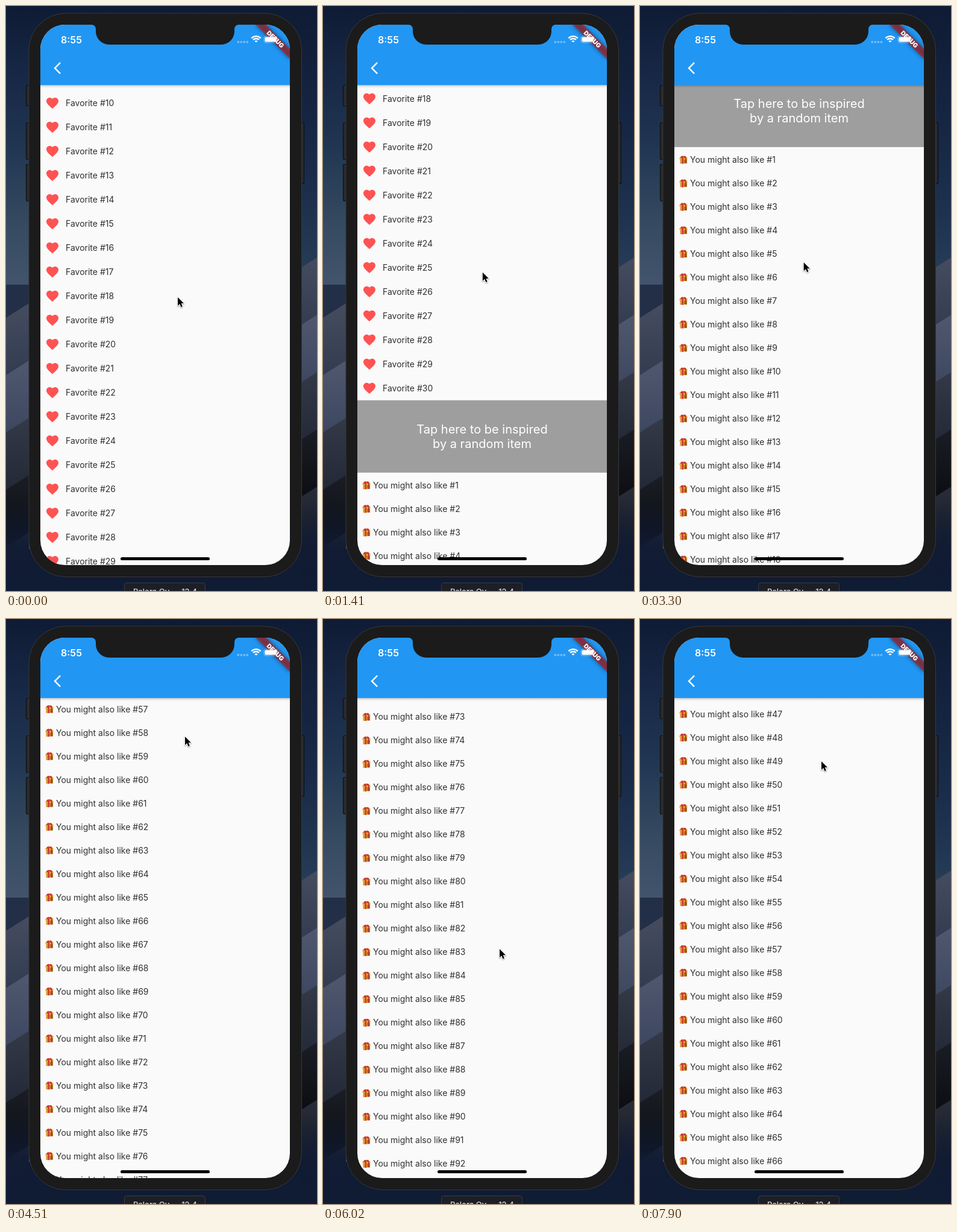
An HTML page with a canvas for the animation above (7.99 s loop, 516 by 970 pixels).

```html
<!DOCTYPE html>
<html lang="en">
<head>
<meta charset="utf-8">
<title>Favorites list</title>
<style>
  html, body { margin: 0; width: 100%; height: 100%; overflow: hidden; background: #101c36; }
  canvas { display: block; }
</style>
</head>
<body>
<canvas id="stage" width="516" height="970"></canvas>
<script>
const ctx = document.getElementById('stage').getContext('2d');
const LOOP = 7990;
const FONT = 'Inter, Roboto, sans-serif';
const SCREEN = { x: 57, y: 31, w: 414, h: 896 };
const BAR_BOTTOM = 131;
const INK = '#303030';

const mix = (a, b, u) => a + (b - a) * u;
const clamp = u => Math.min(1, Math.max(0, u));
const smooth = u => u * u * (3 - 2 * u);
const square = u => u * u;
const part = (t, [t0, t1]) => clamp((t - t0) / (t1 - t0));

// ---- motion ----
// Each gesture drags the list by `travel`, then lets it coast; the pointer glides on to the next start.
const GESTURES = [
  { time: [0, 790], from: [285, 483], to: [269, 110], travel: 320, coast: 10.2, glide: [880, 2050] },
  { time: [2490, 2850], from: [217, 880], to: [263, 308], travel: 537.2, coast: 0, glide: [3180, 3375] },
  { time: [3560, 3800], from: [291, 481], to: [297, 195], travel: 268, coast: 2664, glide: [5350, 6050] },
  { time: [6560, 6860], from: [293, 549], to: [297, 840], travel: -266, coast: -864, glide: [7380, 7900] }
];
const FIRST_SCROLL = 240, LAST_POINT = [301, 236];
const COAST_LIMIT = 2490, COAST_DECAY = 500;

const dragPart = (g, t) => (Math.abs(g.coast) > 50 ? square : smooth)(part(t, g.time));

function scrollAt(t) {
  return GESTURES.reduce((s, g, i) => {
    const next = GESTURES[i + 1];
    const until = Math.min(t, next ? next.time[0] : LOOP);
    const age = Math.min(COAST_LIMIT, Math.max(0, until - g.time[1]));
    return s + g.travel * dragPart(g, t) + g.coast * (1 - Math.exp(-age / COAST_DECAY));
  }, FIRST_SCROLL);
}

function pointerAt(t) {
  const i = GESTURES.findLastIndex(g => g.time[0] <= t);
  const g = GESTURES[i];
  const next = GESTURES[i + 1] ? GESTURES[i + 1].from : LAST_POINT;
  if (t < g.time[1]) return g.from.map((v, k) => mix(v, g.to[k], dragPart(g, t)));
  const u = smooth(part(t, g.glide));
  return [mix(g.to[0], next[0], u ** 3), mix(g.to[1], next[1], u)];
}

// ---- drawing helpers ----
function box(x, y, w, h, color) {
  ctx.fillStyle = color;
  ctx.fillRect(x, y, w, h);
}
function roundBox(x, y, w, h, r, fill, line) {
  ctx.beginPath();
  ctx.roundRect(x, y, w, h, r);
  if (fill) { ctx.fillStyle = fill; ctx.fill(); }
  if (line) { ctx.strokeStyle = line; ctx.lineWidth = 1; ctx.stroke(); }
}
function fade(y0, y1, ...colors) {
  const g = ctx.createLinearGradient(0, y0, 0, y1);
  colors.forEach((c, i) => g.addColorStop(i / (colors.length - 1), c));
  return g;
}
function text(str, x, y, font, color, align = 'left') {
  ctx.font = font + ' ' + FONT;
  ctx.fillStyle = color;
  ctx.textAlign = align;
  ctx.fillText(str, x, y);
}
function icon(path, x, y, color) {
  ctx.save();
  ctx.translate(x, y);
  ctx.fillStyle = color;
  ctx.fill(path);
  ctx.restore();
}

// ---- desktop and device ----
function drawDunes(x, top) {
  for (let i = 0; i < 5; i++) {
    const y = top + i * 95;
    const light = 17 + 13 * Math.sin(i * 1.3 + .6);
    ctx.beginPath();
    ctx.moveTo(x, y + 12);
    ctx.lineTo(x + 38, y - 12);
    ctx.lineTo(x + 38, 970);
    ctx.lineTo(x, 970);
    ctx.fillStyle = fade(y - 12, y + 130, `hsl(224 16% ${light + 8}%)`, `hsl(222 24% ${light}%)`);
    ctx.fill();
  }
  box(x, 820, 38, 150, fade(820, 970, 'rgba(16,27,52,0)', 'rgba(16,27,52,.9)', '#101b34'));
}

function drawDesktop() {
  box(0, 0, 258, 970, fade(0, 470, '#0f1b34', '#172846', '#213652', '#34495f', '#43556d'));
  box(258, 0, 258, 970, fade(0, 440, '#0f1b34', '#14233f', '#1a2d4a', '#263c57'));
  box(0, 462, 38, 60, '#232f47');
  drawDunes(0, 505);
  drawDunes(480, 428);
  box(38, 900, 452, 70, '#101b34');
}

function drawDevice() {
  [[33, 131, 34], [33, 193, 61], [33, 262, 61], [488, 193, 101]].forEach(([x, y, h]) =>
    roundBox(x + .5, y + .5, 6, h, 1.5, '#28292b', '#0b0c0f'));
  roundBox(38, 12, 452.5, 934.5, 61, '#1b1b1b', '#36383d');
  roundBox(196.5, 956.5, 134, 30, 4, '#1c1f25', '#393c44');
  text('Pelora Qv — 12.4', 264, 976, '500 13px', '#d5d7dc', 'center');
}

// ---- list ----
const heart = new Path2D('M12 21.35l-1.45-1.32C5.4 15.36 2 12.28 2 8.5 2 5.42 4.42 3 7.5 3' +
  'c1.74 0 3.41.81 4.5 2.09C13.09 3.81 14.76 3 16.5 3 19.58 3 22 5.42 22 8.5' +
  'c0 3.78-3.4 6.86-8.55 11.54L12 21.35z');
const chevron = new Path2D('M11.67 3.87L9.9 2.1 0 12l9.9 9.9 1.77-1.77L3.54 12z');
const arrow = new Path2D('M0 0V14L3.2 11 5.5 16.2 7.8 15.2 5.7 10.1 10 10z');

function drawFavorite(n, y) {
  icon(heart, 65, y - 12, '#ff5252');
  text('Favorite #' + n, 99, y + 5, '14px', INK);
}

function drawGift(x, y) {
  box(x - 5.5, y - 2, 6.5, 8.5, '#e2982f');
  box(x + 1, y - 2, 5, 8, '#b36f28');
  box(x - 6.5, y - 4, 13, 3.5, '#e8a840');
  box(x - 2.5, y - 4, 2.5, 10.5, '#cf3a2c');
  box(x + 3, y - 3, 1.5, 9, '#a3301f');
  ctx.fillStyle = '#c8382b';
  [-1, 1].forEach(side => {
    ctx.beginPath();
    ctx.ellipse(x + 2.4 * side, y - 4.6, 2.6, 1.7, .4 * side, 0, 7);
    ctx.fill();
  });
}

function drawList(s) {
  const { x, y, w, h } = SCREEN, end = y + h + 20;
  box(x, y, w, h, '#fafafa');
  for (let n = 1; n <= 30; n++) {
    const c = 40 * n + 1 - s;
    if (c > 100 && c < end) drawFavorite(n, c);
  }
  const top = 1221 - s;
  if (top > 0 && top < end) {
    box(x, top, w, 120, '#9e9e9e');
    text('Tap here to be inspired', 264, top + 55, '20px', '#fff', 'center');
    text('by a random item', 264, top + 79, '20px', '#fff', 'center');
  }
  for (let m = Math.max(1, Math.floor((s - 1223) / 39)); ; m++) {
    const c = 1323 + 39 * m - s;
    if (c > end) break;
    drawGift(72, c);
    text('You might also like #' + m, 83, c + 5, '14px', INK);
  }
}

// ---- bars ----
function drawAppBar() {
  const { x, y, w } = SCREEN;
  box(x, BAR_BOTTOM, w, 5, fade(BAR_BOTTOM, BAR_BOTTOM + 5, 'rgba(0,0,0,.22)', 'rgba(0,0,0,.08)', 'rgba(0,0,0,0)'));
  box(x, y, w, BAR_BOTTOM - y, '#2196f3');
  icon(chevron, 79.3, 91, '#fff');
}

function drawRibbon() {
  const away = 2000;
  ctx.save();
  ctx.translate(SCREEN.x + SCREEN.w, SCREEN.y);
  ctx.rotate(Math.PI / 4);
  // the shape stays off stage, only its shadow lands here
  ctx.save();
  ctx.shadowColor = 'rgba(0,0,0,.5)';
  ctx.shadowBlur = 7;
  ctx.shadowOffsetX = away;
  ctx.translate(-away * Math.SQRT1_2, away * Math.SQRT1_2);
  box(-40, 28, 80, 12, '#000');
  ctx.restore();
  box(-40, 28, 80, 12, 'rgba(183,28,28,.627)');
  text('DEBUG', 0, 37.7, '900 10.2px', '#fff', 'center');
  ctx.restore();
}

function drawStatus() {
  text('8:55', 91, 62, '600 16px', '#fff');
  ctx.fillStyle = 'rgba(255,255,255,.35)';
  for (let i = 0; i < 4; i++) {
    ctx.beginPath();
    ctx.arc(385.3 + i * 5, 59.7, 2, 0, 7);
    ctx.fill();
  }
  ctx.strokeStyle = '#fff';
  ctx.lineWidth = 2.3;
  [10.8, 7, 2.5].forEach(r => {
    ctx.beginPath();
    ctx.arc(415, 61, r, -Math.PI * .75, -Math.PI * .25);
    ctx.stroke();
  });
  roundBox(428, 50, 22, 11, 3, null, 'rgba(255,255,255,.4)');
  roundBox(429.5, 51.5, 19, 8, 1.8, '#fff');
  roundBox(451.3, 53.5, 1.5, 4, 1, 'rgba(255,255,255,.5)');
}

function drawNotch() {
  const left = 149, right = 379, top = SCREEN.y, bottom = 64, r = 22, lip = 7;
  ctx.beginPath();
  ctx.moveTo(left - lip, top - 1);
  ctx.lineTo(left - lip, top);
  ctx.arcTo(left, top, left, top + lip, lip);
  ctx.arcTo(left, bottom, left + r, bottom, r);
  ctx.arcTo(right, bottom, right, bottom - r, r);
  ctx.arcTo(right, top, right + lip, top, lip);
  ctx.lineTo(right + lip, top - 1);
  ctx.fillStyle = '#1b1b1b';
  ctx.fill();
}

function drawPointer([x, y]) {
  ctx.save();
  ctx.translate(x, y);
  ctx.shadowColor = 'rgba(0,0,0,.4)';
  ctx.shadowBlur = 2;
  ctx.shadowOffsetY = 1;
  ctx.lineWidth = 2;
  ctx.lineJoin = 'round';
  ctx.strokeStyle = '#fff';
  ctx.stroke(arrow);
  ctx.restore();
  icon(arrow, x, y, '#000');
}

function draw(t) {
  drawDesktop();
  drawDevice();
  ctx.save();
  ctx.beginPath();
  ctx.roundRect(SCREEN.x, SCREEN.y, SCREEN.w, SCREEN.h, 41);
  ctx.clip();
  drawList(scrollAt(t));
  drawAppBar();
  drawRibbon();
  drawStatus();
  roundBox(190, 914, 148, 5, 2.5, '#000');
  ctx.restore();
  drawNotch();
  drawPointer(pointerAt(t));
}

const start = performance.now();
function tick() {
  draw(Math.max(0, performance.now() - start) % LOOP);
  requestAnimationFrame(tick);
}
tick();
</script>
</body>
</html>
```
